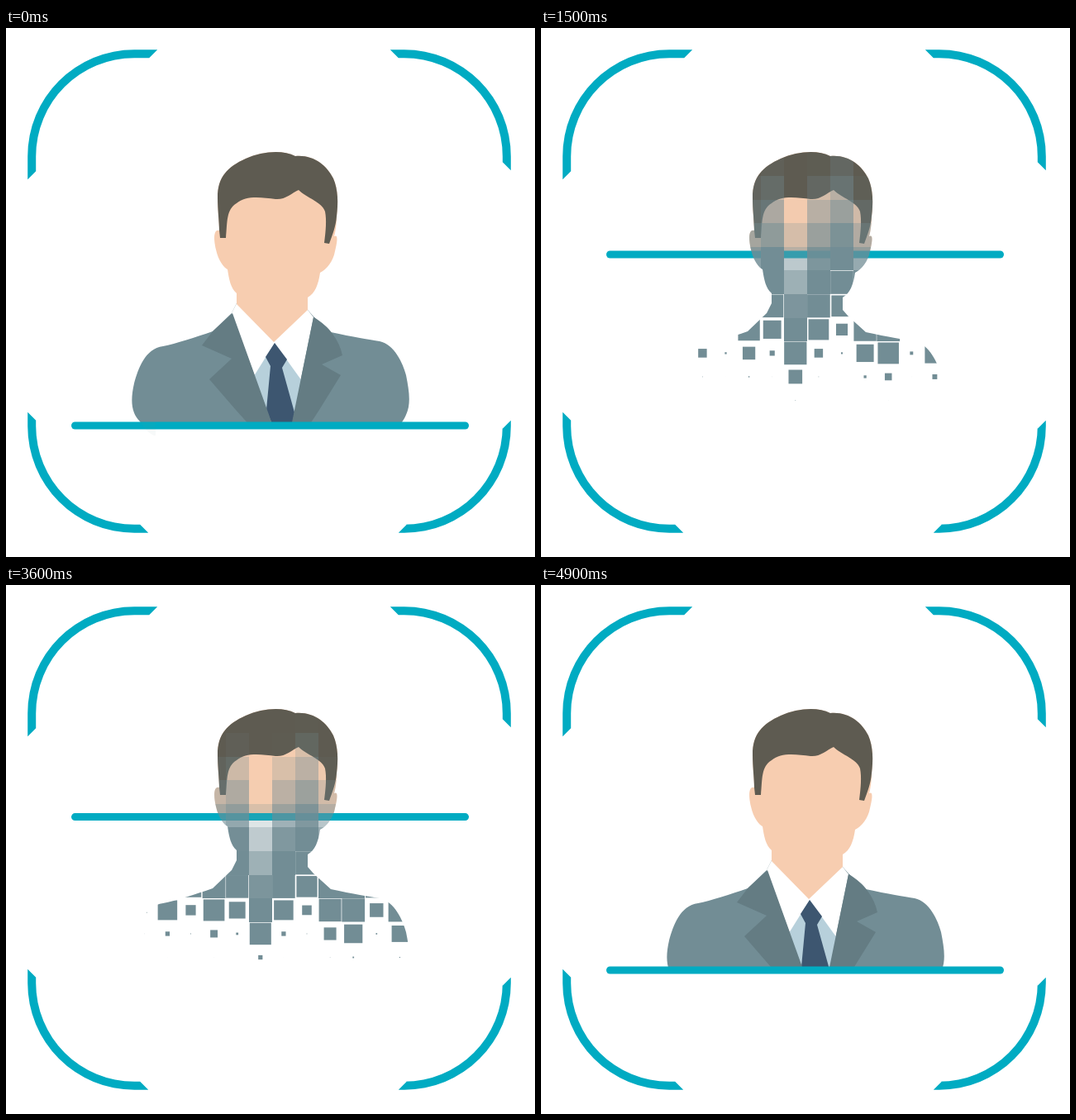
An HTML page with a canvas for the animation above (5000 ms loop, 640x640 px).

```html
<!DOCTYPE html>
<html lang="en">
<head>
<meta charset="utf-8">
<title>Scanner</title>
<style>
  html, body { margin: 0; height: 100%; overflow: hidden; background: #fff; }
  canvas { display: block; }
</style>
</head>
<body>
<canvas id="stage" width="640" height="640"></canvas>
<script>
const ctx = document.getElementById('stage').getContext('2d');
const LOOP = 5000, STEP = 100;
const TEAL = '#00abc2', STEEL = '#728d95';

// Scan line: time, y, speed in px per ms
const LINE = [
  [0, 481, -.06], [1000, 364, -.165], [1500, 274, -.185], [2300, 157.5, -.125],
  [2550, 141.5, 0], [3100, 190.5, .165], [4000, 351, .16], [4900, 466, .08], [5000, 473, .06]
];

// How long each column of cells lingers behind the others
const LAG = [-2.8, 0, -1.9, .7, -.75, 4, 0, -2, 1.6, 2.8, -1.3, 2.3];
const ROWS = 12, CELL_W = 28.1, CELL_H = 28.55, LEFT = 167.3, TOP = 165;

const hairTop = 'M350 155C335 147 310 149 290 158C268 168 256 180 256 205C256 220 258 235 258 245';
const headLine = hairTop + 'C251 243 251 255 254 268C257 282 264 290 268 292C270 305 272 315 279 321' +
  'V334L324 380L365 341V326C374 321 378 310 380 296C388 292 396 282 398 270C401 258 402 249 397 252' +
  'C399 245 400 235 400 228C402 212 402 196 396 182C388 166 372 153 350 155Z';
const bodyLine = 'M279 333L273 345L250 367C230 374 205 382 190 385C168 388 160 412 155 430' +
  'C150 452 152 466 162 476C168 486 175 493 185 495H455C468 489 478 482 484 468C490 455 488 440 484 420' +
  'C480 405 470 383 452 379C440 377 420 374 393 368L372 349L365 341L324 380Z';

const PARTS = [
  [STEEL, bodyLine],
  ['#fff', 'M279 333L273 345L316 462L323 482H345L372 350L365 341Z'],
  ['#b7d0db', 'M325 381L300 421L323 482H345L358 427Z'],
  ['#3d5670', 'M325 381L340 401L334 411L349 465L346 482H323L315 462L320 409L314 398Z'],
  ['#647c83', 'M274 345L250 367L237 384L273 400L246 425L278 462L296 482H323L316 462Z'],
  ['#647c83', 'M372 350C382 355 391 364 395 370Q404 382 407 396L382 407L405 420L379 462L366 482H345Z'],
  ['#f7cdb0', headLine],
  ['#5e5b51', hairTop + 'L259 254H266C268 235 266 220 279 212C290 202 310 205 326 207' +
    'C338 208 345 200 354 196C364 206 382 210 386 222C388 232 387 245 385 260L391 261' +
    'C395 250 399 240 400 228C402 212 402 196 396 182C388 166 372 153 350 155Z']
].map(([color, d]) => [color, new Path2D(d)]);
const silhouette = new Path2D(bodyLine + headLine);

const clamp = v => Math.max(0, Math.min(1, v));

function lineY(t) {
  const i = LINE.findIndex(k => k[0] > t);
  const [t0, y0, v0] = LINE[i - 1], [t1, y1, v1] = LINE[i];
  const d = t1 - t0, s = (t - t0) / d, r = 1 - s;
  return y0 * r * r * (1 + 2 * s) + y1 * s * s * (3 - 2 * s) + d * s * r * (v0 * r - v1 * s);
}

function corner(flipX, flipY, n) {
  ctx.save();
  ctx.translate(318.5, 318.5);
  ctx.scale(flipX, flipY);
  ctx.translate(-292.3, -292.3);
  ctx.fillStyle = TEAL;
  ctx.fill(new Path2D(`M${n} 0H129A129 129 0 0 0 0 129V${n}L10 ${n - 10}V129A119 119 0 0 1 129 10H${n - 10}Z`));
  ctx.restore();
}

function person(y) {
  ctx.save();
  ctx.beginPath();
  ctx.rect(0, 0, 640, y);
  ctx.clip();
  for (const [color, path] of PARTS) {
    ctx.fillStyle = color;
    ctx.fill(path);
  }
  ctx.restore();
}

function cell(col, row, life) {
  const x = LEFT + col * CELL_W, y = TOP + row * CELL_H;
  const size = life > 5 ? 1 : 1 / (1 + Math.exp(-life));
  const snap = size === 1 ? Math.round : v => v;
  const w = CELL_W * size / 2, h = CELL_H * size / 2;
  const x0 = snap(x - w), y0 = snap(y - h);
  ctx.globalAlpha = clamp((16.5 - life) / 9);
  ctx.fillRect(x0, y0, snap(x + w) - x0, snap(y + h) - y0);
}

// Cells fade in ahead of the line, then shrink away behind it
function mosaic(t) {
  const wave = t < 2575 ? 48 - .02117 * t : .0243 * (t - 2575) - 6.5;
  ctx.save();
  ctx.clip(silhouette);
  ctx.fillStyle = STEEL;
  for (let row = 0; row < ROWS; row++) {
    const depth = 2 * row + .003 * Math.max(0, row - 4) ** 4;
    LAG.forEach((lag, col) => cell(col, row, wave - depth + lag));
  }
  ctx.restore();
}

function draw(t) {
  const y = lineY(t);
  ctx.fillStyle = '#fff';
  ctx.fillRect(0, 0, 640, 640);
  corner(1, 1, 157);
  corner(-1, 1, 146);
  corner(1, -1, 146);
  corner(-1, -1, 136);
  person(y);
  ctx.fillStyle = TEAL;
  ctx.beginPath();
  ctx.roundRect(79, y - 4.5, 481, 9, 4.5);
  ctx.fill();
  mosaic(t);
}

const start = performance.now();
function tick() {
  const t = (performance.now() - start) % LOOP;
  draw(Math.floor(t / STEP) * STEP);
  requestAnimationFrame(tick);
}
tick();
</script>
</body>
</html>
```
